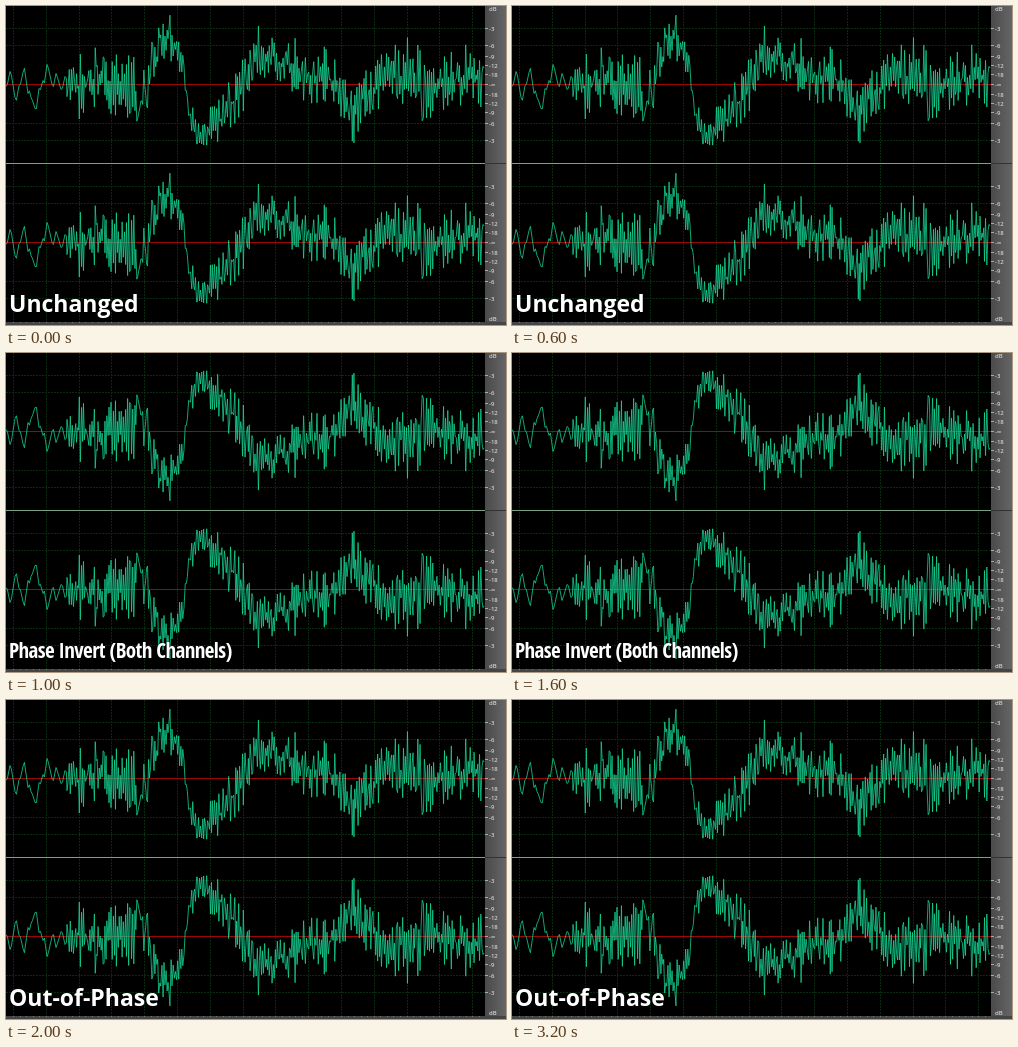
Recreate the animation shown at these times as an HTML page with a canvas. Size 500 by 319 pixels, loop 4000 ms.

```html
<!DOCTYPE html>
<html lang="en">
<head>
<meta charset="utf-8">
<title>Phase comparison</title>
<style>
  html, body { margin: 0; width: 100%; height: 100%; overflow: hidden; background: #000; }
  canvas { position: absolute; left: 0; top: 0; }
  #caption {
    position: absolute; left: 3px; top: 281px; line-height: 32px; white-space: nowrap;
    font: 700 23px/32px "Open Sans", sans-serif; color: #fff;
    text-shadow: 0 0 2px #000;
  }
  #caption.narrow {
    font-family: "Open Sans Condensed", "Open Sans", "Liberation Sans Narrow", sans-serif;
    font-size: 21px; font-stretch: 75%; letter-spacing: -0.6px;
  }
</style>
</head>
<body>
<canvas id="view" width="500" height="319"></canvas>
<div id="caption"></div>
<script>
const ctx = document.getElementById('view').getContext('2d');
const caption = document.getElementById('caption');
const RIGHT = 479, MID = [78.5, 236.5], HALF = 78;

const SCENES = [
  { end: 1000, text: 'Unchanged', signs: [1, 1] },
  { end: 2000, text: 'Phase Invert (Both Channels)', signs: [-1, -1], narrow: true },
  { end: 4000, text: 'Out-of-Phase', signs: [1, -1] }
];

// Calm opening: x, y offset from the centre line
const INTRO = [[0, 2], [4, -13], [9, 13], [13, 1], [17, -12], [22, 9], [25, 13], [29, 24],
  [33, 4], [37, -4], [41, -20], [46, 0], [50, -11], [55, 5], [59, -8]];

// Busy part: x, highest and lowest offset
const BOUNDS = [[60, -25, 25], [72, -34, 38], [96, -38, 34], [112, -34, 34], [126, -32, 34],
  [135, -10, 45], [142, -22, 32], [148, -62, -5], [155, -74, -25], [164, -72, -22],
  [172, -48, -14], [178, -25, 10], [184, 8, 52], [196, 32, 77], [208, 18, 66],
  [220, -2, 52], [232, -18, 36], [244, -46, 18], [252, -60, -2], [264, -50, 6],
  [284, -53, 14], [304, -40, 22], [326, -38, 28], [338, -8, 46], [346, 2, 68],
  [356, -12, 36], [380, -36, 24], [406, -50, 32], [426, -26, 42], [446, -34, 26],
  [468, -44, 24], [479, -20, 22]];

function seeded(seed) {
  return () => {
    seed = (seed * 1664525 + 1013904223) >>> 0;
    return seed / 4294967296;
  };
}

function bounds(x) {
  let i = 1;
  while (i < BOUNDS.length - 1 && BOUNDS[i][0] < x) i++;
  const a = BOUNDS[i - 1], b = BOUNDS[i], k = (x - a[0]) / (b[0] - a[0]);
  return [a[1] + (b[1] - a[1]) * k, a[2] + (b[2] - a[2]) * k];
}

function makeWave() {
  const rnd = seeded(73), pts = [];
  INTRO.forEach(([x, y]) => {
    pts.push([x, y], [x + 1.4, y + (rnd() - 0.5) * 9]);
  });
  let side = 1;
  for (let x = 61; x <= RIGHT; x += 0.75 + rnd() * 0.55) {
    const [hi, lo] = bounds(x);
    const push = side * Math.pow(rnd(), 1.25);
    pts.push([x, (hi + lo) / 2 + push * (lo - hi) / 2]);
    if (rnd() < 0.82) side = -side;
  }
  return pts;
}
const wave = makeWave();

function rect(color, x, y, w, h) {
  ctx.fillStyle = color;
  ctx.fillRect(x, y, w, h);
}

const LEVELS = [[0, '-∞'], [10, '-18'], [19, '-12'], [28, '-9'], [39, '-6'], [56, '-3']];

function drawGrid() {
  rect('#000', 0, 0, 500, 319);
  ctx.strokeStyle = '#082a10';
  ctx.lineWidth = 1;
  ctx.setLineDash([2, 1]);
  ctx.beginPath();
  for (let x = 7.5; x < RIGHT; x += 32.8) {
    ctx.moveTo(Math.floor(x) + 0.5, 0);
    ctx.lineTo(Math.floor(x) + 0.5, 316);
  }
  for (const mid of MID)
    for (const d of [-56, -39, 39, 56]) {
      ctx.moveTo(0, mid + d);
      ctx.lineTo(RIGHT, mid + d);
    }
  ctx.stroke();
  ctx.setLineDash([]);
  for (const mid of MID) rect('#9c0808', 0, mid - 0.5, RIGHT, 1);
}

function drawChannel(mid, sign) {
  ctx.save();
  ctx.beginPath();
  ctx.rect(0, mid - HALF - 0.5, RIGHT, HALF * 2 + 1);
  ctx.clip();
  ctx.beginPath();
  for (const [x, y] of wave) ctx.lineTo(x, mid + sign * y);
  ctx.strokeStyle = '#16dc9a';
  ctx.lineWidth = 0.75;
  ctx.lineJoin = 'bevel';
  ctx.stroke();
  ctx.restore();
}

function drawRulers() {
  const shade = ctx.createLinearGradient(RIGHT, 0, 500, 0);
  shade.addColorStop(0, '#4a4a4a');
  shade.addColorStop(1, '#666');
  rect(shade, RIGHT, 0, 21, 319);
  rect('#454545', 0, 316, 500, 3);
  for (let x = 7; x < RIGHT; x += 6.56) rect('#777', Math.round(x), 316, 1, 1);
  rect('#79a183', 0, 157, RIGHT, 1);
  rect('#333', RIGHT, 157, 21, 1);
  ctx.font = '600 6px "Open Sans", sans-serif';
  ctx.textBaseline = 'middle';
  const label = (text, y) => {
    ctx.fillStyle = '#d0d0d0';
    ctx.fillText(text, 483, y);
  };
  for (const mid of MID)
    for (const [d, text] of LEVELS)
      for (const y of d ? [mid - d, mid + d] : [mid]) {
        rect('#aaa', RIGHT, Math.floor(y), 3, 1);
        label(text, y + 0.5);
      }
  label('dB', 3);
  label('dB', 313);
}

let shown = null;
function frame() {
  const t = performance.now() % 4000;
  const scene = SCENES.find(s => t < s.end);
  if (scene !== shown) {
    shown = scene;
    drawGrid();
    MID.forEach((mid, i) => drawChannel(mid, scene.signs[i]));
    drawRulers();
    caption.textContent = scene.text;
    caption.classList.toggle('narrow', !!scene.narrow);
  }
  requestAnimationFrame(frame);
}
frame();
</script>
</body>
</html>
```
